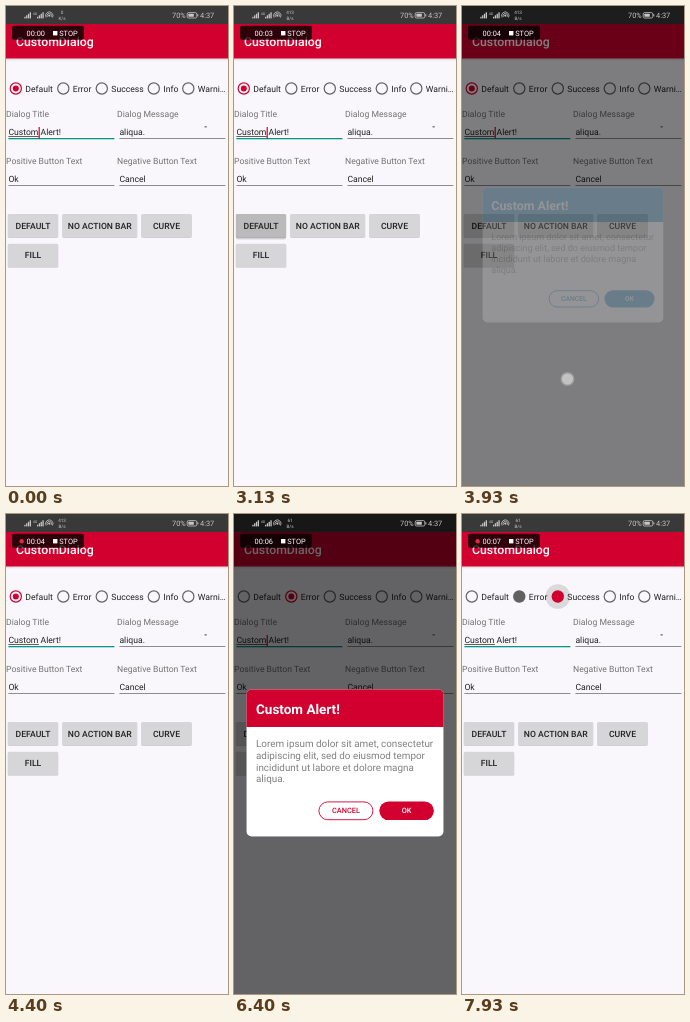
Animation, 222 px wide and 480 px high, one loop 8000 ms. Source, as an HTML page:

```html
<!DOCTYPE html>
<html lang="en">
<head>
<meta charset="utf-8">
<title>CustomDialog</title>
<style>
html, body { margin: 0; width: 100%; height: 100%; overflow: hidden; background: #f9f7fb; }
svg { display: block; width: 100vw; height: 100vh; }
text { font-family: Roboto, "Liberation Sans", sans-serif; text-rendering: geometricPrecision; white-space: pre; }
</style>
</head>
<body>
<script>
const LOOP = 8000;
const RED = '#d1002f', BLUE = '#0a84c0', INK = '#212121', GREY = '#737373', RING = '#616161', PAPER = '#f9f7fb';

// Drawing helpers
const NS = 'http://www.w3.org/2000/svg';
function add(parent, tag, attrs = {}, content) {
  const el = document.createElementNS(NS, tag);
  set(el, attrs);
  if (content !== undefined) el.textContent = content;
  return parent.appendChild(el);
}
function set(el, attrs) {
  for (const key in attrs) el.setAttribute(key, attrs[key]);
}
const group = (p, attrs) => add(p, 'g', attrs);
const rect = (p, x, y, width, height, fill, more) => add(p, 'rect', { x, y, width, height, fill, ...more });
const disc = (p, cx, cy, r, fill, more) => add(p, 'circle', { cx, cy, r, fill, ...more });
const label = (p, x, y, size, fill, content, more) =>
  add(p, 'text', { x, y, 'font-size': size, fill, ...more }, content);
const centred = { 'text-anchor': 'middle', 'font-weight': 500 };

// Timing helpers
const ramp = (t, a, b) => Math.min(1, Math.max(0, (t - a) / (b - a)));
const slow = p => 1 - (1 - p) ** 2;
const count = (t, times) => times.filter(at => t >= at).length;

const svg = add(document.body, 'svg', { viewBox: '0 0 222 480', preserveAspectRatio: 'none' });
const defs = add(svg, 'defs');
const shade = add(defs, 'linearGradient', { id: 'shade', x2: 0, y2: 1 });
add(shade, 'stop', { 'stop-color': '#000', 'stop-opacity': 0.14 });
add(shade, 'stop', { offset: 1, 'stop-color': '#000', 'stop-opacity': 0 });
const buttonClip = add(defs, 'clipPath', { id: 'button' });
rect(buttonClip, 2, 208, 50, 23, '#000', { rx: 1.2 });

// App screen
const app = group(svg);
rect(app, 0, 0, 222, 480, PAPER);
rect(app, 0, 52.5, 222, 2.5, 'url(#shade)');
rect(app, 0, 0, 222, 18, '#393939');
rect(app, 0, 18, 222, 34.5, RED);
label(app, 10, 40.4, 12.3, '#fff', 'CustomDialog', { 'font-weight': 500 });

function makeRadio(x, name) {
  const halo = disc(app, x, 82.5, 12.3, '#000', { opacity: 0 });
  const rim = disc(app, x, 82.5, 6.2, RING);
  const hole = disc(app, x, 82.5, 5, PAPER);
  const dot = disc(app, x, 82.5, 0, RED);
  label(app, x + 9.5, 85.7, 8.63, INK, name);
  return { halo, rim, hole, dot };
}
const radios = [[9.8, 'Default'], [57.3, 'Error'], [95.8, 'Success'], [147.8, 'Info'], [182.3, 'Warni…']]
  .map(([x, name]) => makeRadio(x, name));

label(app, 0, 111.3, 8.63, GREY, 'Dialog Title');
label(app, 111, 111.3, 8.63, GREY, 'Dialog Message');
label(app, 0, 157.6, 8.63, GREY, 'Positive Button Text');
label(app, 111, 157.6, 8.63, GREY, 'Negative Button Text');
label(app, 2.4, 129.3, 8.63, INK, 'Custom Alert!');
label(app, 113.4, 129.3, 8.63, INK, 'aliqua.');
label(app, 2.4, 175.6, 8.63, INK, 'Ok');
label(app, 113.4, 175.6, 8.63, INK, 'Cancel');
rect(app, 2.4, 130.3, 30.5, 0.7, INK);
rect(app, 198.5, 120.5, 2.3, 0.8, INK);
rect(app, 2.4, 132, 106, 1.3, '#009688');
rect(app, 113.4, 132, 106, 0.8, GREY);
rect(app, 2.4, 179, 106, 0.8, GREY);
rect(app, 113.4, 179, 106, 0.8, GREY);
const caret = rect(app, 32.6, 121, 1.2, 11.6, RED);

const lift = rect(app, 2, 209, 50, 24.5, '#000', { rx: 2 });
let ripple;
for (const [x, y, w, name] of [[2, 208, 50, 'DEFAULT'], [56.5, 208, 74.5, 'NO ACTION BAR'],
  [135.5, 208, 50, 'CURVE'], [2, 237.8, 50, 'FILL']]) {
  rect(app, x - 0.3, y + 0.4, w + 0.6, 23.6, '#000', { rx: 1.4, opacity: 0.16 });
  rect(app, x, y, w, 23, '#d6d5d7', { rx: 1.2 });
  if (!ripple) ripple = disc(app, 27, 219.5, 0, '#000', { 'clip-path': 'url(#button)' });
  label(app, x + w / 2, y + 14.5, 8.63, INK, name, centred);
}

// Dimmer and dialog
const dim = rect(svg, 0, 0, 222, 480, '#000');
const dialog = group(svg);
rect(dialog, 12.6, 176.5, 197.8, 147, '#000', { rx: 5.5, opacity: 0.15 });
rect(dialog, 13, 176, 197, 147, '#fff', { rx: 5 });
const header = add(dialog, 'path', { d: 'M13 213.5V181a5 5 0 0 1 5-5H205a5 5 0 0 1 5 5V213.5Z' });
label(dialog, 22.5, 200, 13.5, '#fff', 'Custom Alert!', { 'font-weight': 700 });
['Lorem ipsum dolor sit amet, consectetur', 'adipiscing elit, sed do eiusmod tempor',
  'incididunt ut labore et dolore magna', 'aliqua.']
  .forEach((line, i) => label(dialog, 22.5, 233.5 + i * 11.8, 9.87, '#808080', line));
const cancelBox = rect(dialog, 85.4, 288.4, 54, 17.8, 'none', { rx: 8.9, 'stroke-width': 0.9 });
const cancelText = label(dialog, 112.4, 299.9, 7.4, RED, 'CANCEL', centred);
const okBox = rect(dialog, 145.8, 288, 54.6, 18.6, RED, { rx: 9.3 });
label(dialog, 173.1, 299.9, 7.4, '#fff', 'OK', centred);

const touch = group(svg);
disc(touch, 105.5, 373, 7, '#fff', { opacity: 0.4 });
disc(touch, 105.5, 373, 5.6, '#f4f4f4');

// Recorder pill
rect(svg, 6, 19.8, 72, 14, '#000', { rx: 2, opacity: 0.78 });
const recDot = disc(svg, 15.7, 27.2, 2.2, '#e5273c');
const clock = label(svg, 20.6, 29.9, 7.4, '#fff', '');
rect(svg, 47, 25, 4.4, 4.4, '#fff');
label(svg, 53.2, 29.9, 7.4, '#fff', 'STOP');

// Status icons
const LIGHT = '#c6c6c6';
for (const x of [18.3, 31]) {
  for (let i = 0; i < 4; i++) rect(svg, x + i * 1.8, 10.8 - i * 1.5, 1.3, 1.6 + i * 1.5, LIGHT);
}
label(svg, 26.8, 8.8, 3.6, LIGHT, '4G');
disc(svg, 43.3, 9.6, 1.1, LIGHT);
for (const [r, drop] of [[2.2, 1.2], [3.7, 1.9]]) {
  const dx = Math.sqrt(r * r - drop * drop);
  add(svg, 'path', {
    d: `M${43.3 - dx} ${9.6 + drop}A${r} ${r} 0 1 1 ${43.3 + dx} ${9.6 + drop}`,
    fill: 'none', stroke: LIGHT, 'stroke-width': 0.8
  });
}
const rate = label(svg, 56, 8.4, 4.6, LIGHT, '', { 'text-anchor': 'middle' });
const unit = label(svg, 56, 13.6, 4.6, LIGHT, '', { 'text-anchor': 'middle' });
label(svg, 166, 12, 7.4, LIGHT, '70%');
rect(svg, 181.2, 6.6, 9.6, 5.4, 'none', { rx: 1.4, stroke: LIGHT, 'stroke-width': 0.8 });
rect(svg, 182.4, 7.8, 5.4, 3, LIGHT, { rx: 0.5 });
rect(svg, 191.4, 8.2, 0.9, 2.2, LIGHT);
label(svg, 194, 12.1, 7.4, LIGHT, '4:37');

// Timeline, in ms
const CARET = [70, 600, 1070, 1600, 2130, 2670, 3230, 3800, 4330, 4870, 5400, 5930, 6470, 7000, 7530];
const SECONDS = [870, 1900, 2900, 3900, 4930, 5950, 6950];
const BLINK = [270, 800, 1330, 1870, 2330, 2870, 3400, 3900, 4400, 4930, 5430, 5950, 6450, 6950, 7450];
const SPEEDS = [['0', 'K/s'], ['413', 'B/s'], ['61', 'B/s']];
const SPEED_AT = [2730, 5730];
const PRESSES = [[2670, 3270], [5480, 6130]];
const DIALOGS = [{ open: 3250, close: 3850, color: BLUE }, { open: 6081, close: 6750, color: RED }];
const TAPS = [null, { down: 4680, up: 4930 }, { down: 7640, up: 7860 }];

function drawRadio(radio, t, i) {
  const tap = TAPS[i], next = TAPS[i + 1];
  const inside = i < 3;
  const on = !inside ? 0 : i ? ramp(t, tap.up, tap.up + 150) : 1;
  const off = inside && next ? ramp(t, next.up, next.up + 150) : 0;
  const color = on > 0 && !off ? RED : RING;
  let hole = 5, dot = 0;
  if (off) {
    if (off < 0.5) { hole = 5 * (1 - 2 * off); dot = 3 * (1 - off); }
    else hole = 5 * ramp(off, 0.5, 1);
  } else if (on > 0) {
    if (on < 0.5) hole = 5 * (1 - 2 * on);
    else dot = 5 - 2 * ramp(on, 0.5, 1);
  }
  set(radio.rim, { fill: color });
  set(radio.hole, { r: hole });
  set(radio.dot, { r: dot, fill: color });
  if (inside && tap) {
    const p = slow(ramp(t, tap.down, tap.down + 220));
    set(radio.halo, { r: 5 + 7.3 * p, opacity: 0.12 * p * (1 - ramp(t, tap.up + 90, tap.up + 350)) });
  }
}

function drawPress(t) {
  const [down, up] = PRESSES.find(([, end]) => t < end + 300) || PRESSES[1];
  const grow = slow(ramp(t, down, down + 260));
  const fade = 1 - ramp(t, up, up + 300);
  set(ripple, { r: 32 * grow, opacity: 0.13 * fade });
  set(lift, { opacity: 0.16 * grow * fade });
}

function drawDialog(t) {
  const { open, close, color } = DIALOGS.find(d => t < d.close + 420) || DIALOGS[1];
  const shown = slow(ramp(t, open, open + 150)) - slow(ramp(t, close, close + 140));
  const scale = 0.9 + 0.1 * shown;
  set(dialog, {
    opacity: shown,
    transform: `translate(111 249) scale(${scale}) translate(-111.5 -249.5)`
  });
  set(header, { fill: color });
  set(okBox, { fill: color });
  set(cancelBox, { stroke: color });
  set(cancelText, { fill: color });
  set(dim, { opacity: 0.6 * (ramp(t, open + 30, open + 250) - ramp(t, close + 15, close + 400)) });
  set(touch, { opacity: t < close - 60 ? 0 : 1 - ramp(t, close + 40, close + 140) });
}

function draw(t) {
  radios.forEach((radio, i) => drawRadio(radio, t, i));
  drawPress(t);
  drawDialog(t);
  set(caret, { opacity: count(t, CARET) % 2 ? 0 : 1 });
  set(recDot, { opacity: count(t, BLINK) % 2 });
  clock.textContent = '00:0' + count(t, SECONDS);
  [rate.textContent, unit.textContent] = SPEEDS[count(t, SPEED_AT)];
}

const start = performance.now();
function tick() {
  draw((performance.now() - start) % LOOP);
  requestAnimationFrame(tick);
}
tick();
</script>
</body>
</html>
```
